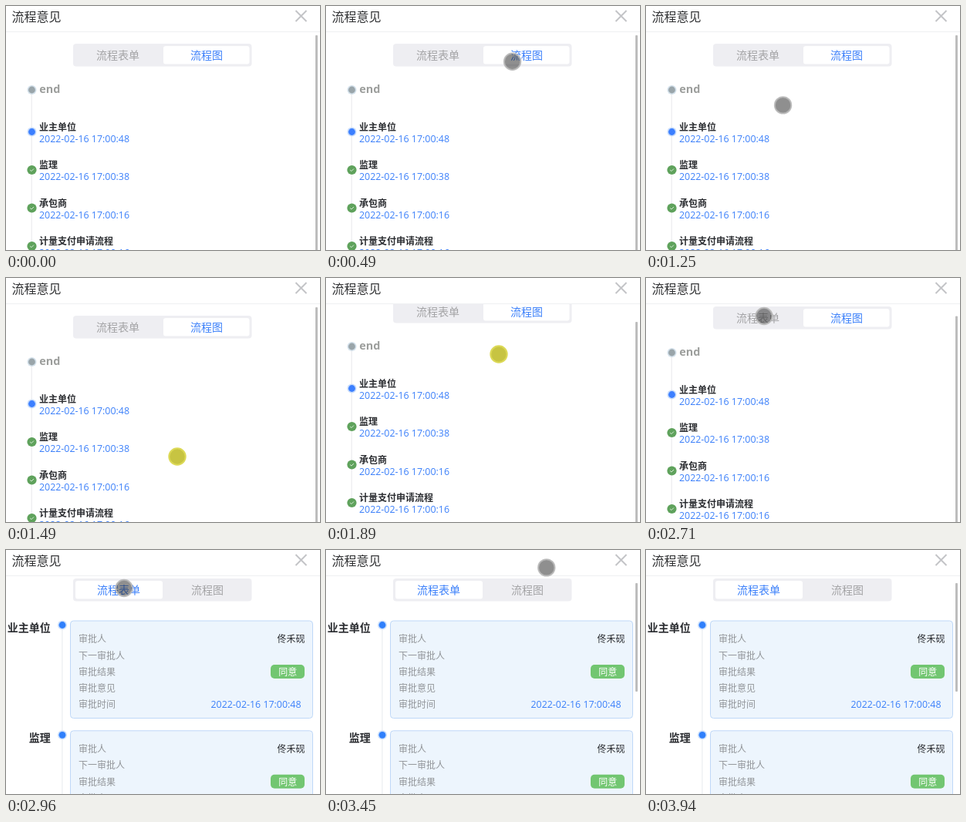
An HTML page for the animation above (4.44 s loop, 407 by 317 pixels).

```html
<!DOCTYPE html>
<html lang="zh-CN">
<head>
<meta charset="utf-8">
<style>
html, body { margin: 0; width: 100%; height: 100%; overflow: hidden; background: #fff; }
svg { display: block; width: 407px; height: 317px; font-family: "Open Sans", "Noto Sans CJK SC", "Noto Sans CJK", sans-serif; }
</style>
</head>
<body>
<svg id="stage" viewBox="0 0 407 317"></svg>
<script>
const LOOP = 4440, SWITCH = 2960, TICK = 80, MAX_SCROLL = 20;
const BLUE = '#3c80fa', GRAY = '#a3a3a5', DARK = '#2b2d31';
const stage = document.getElementById('stage');

function add(parent, tag, attrs, content) {
  const el = document.createElementNS('http://www.w3.org/2000/svg', tag);
  set(el, attrs);
  if (content) el.textContent = content;
  parent.appendChild(el);
  return el;
}
function set(el, attrs) {
  for (const k in attrs) el.setAttribute(k, attrs[k]);
}
const group = (parent) => add(parent, 'g', {});
const rect = (p, x, y, width, height, fill, rx = 0, extra = {}) =>
  add(p, 'rect', { x, y, width, height, fill, rx, ...extra });
const disc = (p, cx, cy, r, fill) => add(p, 'circle', { cx, cy, r, fill });
// Text placed by its vertical centre.
const label = (p, x, cy, s, size, fill, anchor = 'start', weight = 400) =>
  add(p, 'text', { x, y: cy + size * 0.37, 'font-size': size, fill, 'text-anchor': anchor, 'font-weight': weight }, s);
const stamp = (p, x, cy, sec, anchor) =>
  label(p, x, cy, `2022-02-16 17:00:${sec}`, 12.4, BLUE, anchor);

function node(p, x, y, color, halo) {
  disc(p, x, y, 6, halo);
  disc(p, x, y, 4.4, color);
}

function tabs(p, formActive) {
  const shift = formActive ? 1 : 0;
  rect(p, 87, 49, 231.5, 29.5, '#eeeef2', 4);
  rect(p, formActive ? 90 : 204, 52, formActive ? 113 : 111.5, 23.5, '#fff', 3);
  label(p, 145 + shift, 64, '流程表单', 14, formActive ? BLUE : GRAY, 'middle');
  label(p, 260 + shift, 64, '流程图', 14, formActive ? GRAY : BLUE, 'middle');
}

function buildFlow(p) {
  tabs(p, false);
  rect(p, 32.5, 109, 1.5, 203, '#eff0f2');
  node(p, 33.5, 109, '#9aa5aa', '#d3e0ea');
  label(p, 43.3, 107.8, 'end', 14.4, '#9c9e9c', 'start', 700);
  const steps = [['业主单位', '48'], ['监理', '38'], ['承包商', '16'], ['计量支付申请流程', '16']];
  steps.forEach(([name, sec], i) => {
    const y = 163.5 + i * 49.5;
    if (i === 0) node(p, 33.5, y, '#3c7fff', '#c6dbfb');
    else {
      disc(p, 33.5, y, 6.1, '#5fa25c');
      add(p, 'path', { d: `M31.2 ${y}l1.8 1.6l3-3.1`, fill: 'none', stroke: '#d8ecd6' });
    }
    label(p, 43, y - 6.4, name, 12, DARK, 'start', 700);
    stamp(p, 43, y + 8.5, sec);
  });
}

function buildForm(p) {
  tabs(p, true);
  rect(p, 72.2, 110, 1.4, 240, '#eef0f3');
  [['业主单位', '48'], ['监理', '38']].forEach(([name, sec], i) => {
    const y = 104 + i * 142.8;
    label(p, 57.8, y + 9.3, name, 14, DARK, 'end', 700);
    node(p, 73, y + 5.5, '#2f7ffb', '#c9defc');
    rect(p, 83.5, y, 314, 126.5, '#edf5fd', 4, { stroke: '#bfd8f8' });
    ['审批人', '下一审批人', '审批结果', '审批意见', '审批时间'].forEach((s, k) =>
      label(p, 94, y + 24 + k * 21.2, s, 12, '#929599'));
    label(p, 387.5, y + 24, '佟禾砚', 12, DARK, 'end');
    rect(p, 343, y + 57, 44, 18, '#72c671', 5);
    label(p, 365.3, y + 66.5, '同意', 12, '#fff', 'middle', 500);
    stamp(p, 382.5, y + 108.8, sec, 'end');
  });
}

rect(stage, 0, 0, 407, 317, '#fff');
const flow = group(stage), form = group(stage);
buildFlow(flow);
buildForm(form);
const thumb = rect(stage, 401, 38, 3, 300, '#bdbdbd', 1);
rect(stage, 0, 0, 407, 33, '#fff');
rect(stage, 0, 33, 407, 1, '#eff0f2');
label(stage, 7.5, 13.8, '流程意见', 16, '#303133');
add(stage, 'path', { d: 'M375.5 6L389.5 20M389.5 6L375.5 20', stroke: '#c3c4c7', 'stroke-width': 2 });
const pointer = add(stage, 'circle', { r: 10.7, 'stroke-width': 2 });

// Each stroke starts where the last one ended; a press drags the page along.
const point = (x, y) => ({ x, y });
const move = (from, until, to, bend) => ({ from, until, to, bend });
const press = (from, until, to) => ({ from, until, to, down: true });
const ENTRY = point(342, 270), TAB = point(153, 49.5);
const strokes = [
  move(80, 590, point(149, 66), point(309, 29)),
  move(1170, 1490, point(222, 232), point(213, 206)),
  press(1490, 1890, point(224, 99)),
  press(1890, 2050, point(222, 114)),
  move(2050, 2290, point(203.5, 149.5)),
  press(2370, 2455, point(200, 142.5)),
  move(2455, 2710, TAB),
  press(2795, 2880, TAB),
  move(3130, 3700, point(404, 290), point(330, -95)),
  move(3700, 3940, point(404, 340))
];

// Progress of a stroke in whole ticks.
function progress(s, t) {
  const span = s.until - s.from;
  const n = Math.max(1, Math.round(span / TICK));
  return Math.min(1, Math.floor((t - s.from) / span * n + 1e-6) / n);
}

function curve(a, b, c, p) {
  const q = 1 - p;
  const mix = k => q * q * a[k] + 2 * q * p * b[k] + p * p * c[k];
  return point(mix('x'), mix('y'));
}

function stateAt(t) {
  let at = ENTRY, top = 0, down = false;
  for (const s of strokes) {
    if (t < s.from) break;
    const middle = s.bend || point((at.x + s.to.x) / 2, (at.y + s.to.y) / 2);
    const next = curve(at, middle, s.to, progress(s, t));
    down = !!s.down && t < s.until;
    if (s.down) top = Math.max(0, Math.min(MAX_SCROLL, top + at.y - next.y));
    at = next;
  }
  return { at, top, down };
}

const show = (on) => on ? 'inline' : 'none';

function draw(t) {
  const { at, top, down } = stateAt(t);
  const inForm = t >= SWITCH;
  const transform = `translate(0 ${-top})`;
  set(flow, { display: show(!inForm), transform });
  set(form, { display: show(inForm), transform });
  // The thumb returns one tick after the tab changes.
  set(thumb, {
    display: show(!inForm || t >= SWITCH + TICK),
    y: inForm ? 43 : 38 + top * 0.95,
    height: inForm ? 141 : 300
  });
  set(pointer, {
    display: show(t >= strokes[0].from && t < strokes[strokes.length - 1].until),
    cx: at.x,
    cy: at.y,
    fill: down ? 'rgba(180,176,0,.74)' : 'rgba(40,40,40,.52)',
    stroke: down ? '#dcd956' : 'rgba(184,184,184,.9)'
  });
}

const begin = performance.now();
function loop() {
  draw((performance.now() - begin) % LOOP);
  requestAnimationFrame(loop);
}
draw(0);
requestAnimationFrame(loop);
</script>
</body>
</html>
```
